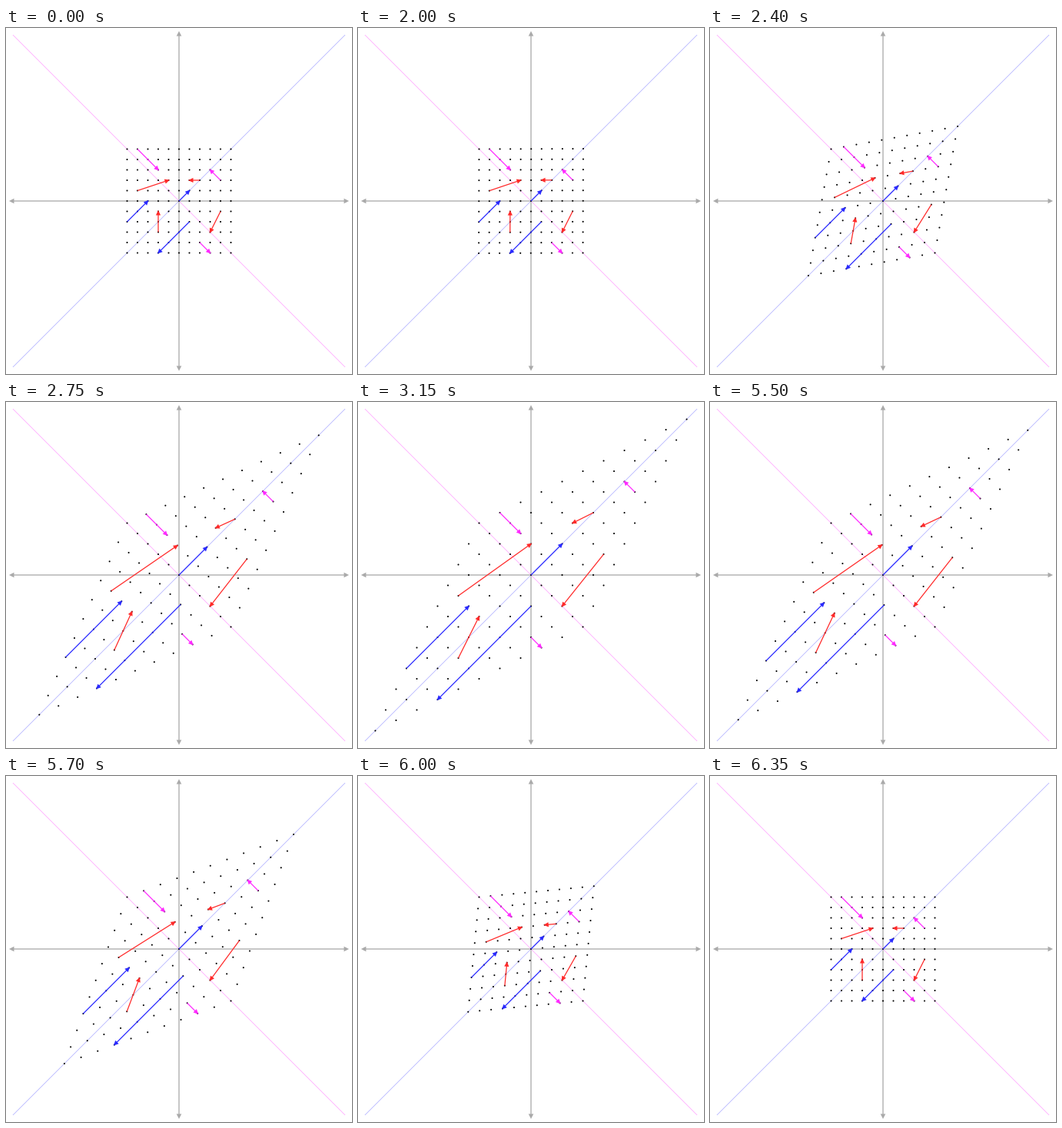
Write a matplotlib script that moves like this. It is 450 by 450 pixels and loops after 6400 ms.

```python
import numpy as np
import matplotlib.pyplot as plt
from matplotlib.animation import FuncAnimation
from matplotlib.collections import LineCollection, PolyCollection

SIZE, DPI = 450, 100
MID, UNIT = SIZE / 2, 13.5
PX = 72 / DPI
STEP_MS, FRAMES = 50, 128
STEPS, OUT, BACK = 24, 40, 104  # length and start frames of the two moves

MATRIX = np.array([[2, 1], [1, 2]])
RED, BLUE, PINK = "#ff2a2a", "#2a2aff", "#ff2aff"
GRAY = "#aaaaaa"

# start x, start y, end x, end y, colour
ARROWS = [
    (-4, 5, -2, 3, PINK), (4, 2, 3, 3, PINK), (2, -4, 3, -5, PINK),
    (-4, 1, -1, 2, RED), (2, 2, 1, 2, RED),
    (-2, -3, -2, -1, RED), (4, -1, 3, -3, RED),
    (-5, -2, -3, 0, BLUE), (0, 0, 1, 1, BLUE), (1, -2, -2, -5, BLUE),
]
starts = np.array([a[0:2] for a in ARROWS])
ends = np.array([a[2:4] for a in ARROWS])
colors = [a[4] for a in ARROWS]
ticks = np.arange(-5, 6)
grid = np.array([(x, y) for x in ticks for y in ticks])
angle = np.linspace(0, 2 * np.pi, 16, endpoint=False)
disc = 1.05 * np.column_stack([np.cos(angle), np.sin(angle)])


def smooth(x):
    """Normalised sigmoid easing from 0 to 1."""
    return 0.5 + 0.5 * np.tanh(5 * (x - 0.5)) / np.tanh(2.5)


def progress(i):
    if i < OUT:
        return 0.0
    if i < BACK:
        return smooth(min((i - OUT + 1) / STEPS, 1))
    return 1 - smooth((i - BACK + 1) / STEPS)


def arrow_shapes(a, b, over=1.5, length=6.5, half=3.1):
    """Shafts and triangular heads for arrows from a to b, in pixels."""
    d = b - a
    d = d / np.linalg.norm(d, axis=1, keepdims=True)
    n = np.column_stack([-d[:, 1], d[:, 0]])
    tip = b + over * d
    base = tip - length * d
    shafts = np.stack([a, base + d], axis=1)
    heads = np.stack([tip, base + half * n, base - half * n], axis=1)
    return shafts, heads


fig = plt.figure(figsize=(SIZE / DPI, SIZE / DPI), dpi=DPI, facecolor="white")
ax = fig.add_axes([0, 0, 1, 1])
ax.set(xlim=(0, SIZE), ylim=(0, SIZE))
ax.axis("off")


def add_lines(segments, color, width, z):
    """Line segments placed at exact sub-pixel positions."""
    art = LineCollection(segments, colors=color, linewidths=width * PX,
                         zorder=z, snap=False)
    return ax.add_collection(art)


def add_shapes(polygons, color, z):
    art = PolyCollection(polygons, facecolors=color, edgecolors="none",
                         zorder=z, snap=False)
    return ax.add_collection(art)


# Coordinate axes
dirs = np.array([(1, 0), (-1, 0), (0, 1), (0, -1)])
shafts, heads = arrow_shapes(np.full((4, 2), MID), MID + 221 * dirs,
                             over=0, half=3.3)
add_lines(shafts, GRAY, 1.3, 1)
add_shapes(heads, GRAY, 1)

# Eigenvector lines
lo, hi = MID - 16 * UNIT, MID + 16 * UNIT
add_lines([[(lo, hi), (hi, lo)]], "#ffa8ff", 0.8, 2)
add_lines([[(lo, lo), (hi, hi)]], "#b4b4ff", 0.8, 2)

dots = add_shapes([], "black", 3)
lines = add_lines([], colors, 1.25, 4)
tips = add_shapes([], colors, 5)


def draw(i):
    m = np.eye(2) + progress(i) * (MATRIX - np.eye(2))
    place = lambda p: MID + UNIT * p @ m.T
    dots.set_verts(place(grid)[:, None] + disc)
    shafts, heads = arrow_shapes(place(starts), place(ends))
    lines.set_segments(shafts)
    tips.set_verts(heads)
    return dots, lines, tips


anim = FuncAnimation(fig, draw, frames=FRAMES, interval=STEP_MS,
                     init_func=lambda: draw(0), repeat=True, repeat_delay=0)
plt.show()
```
